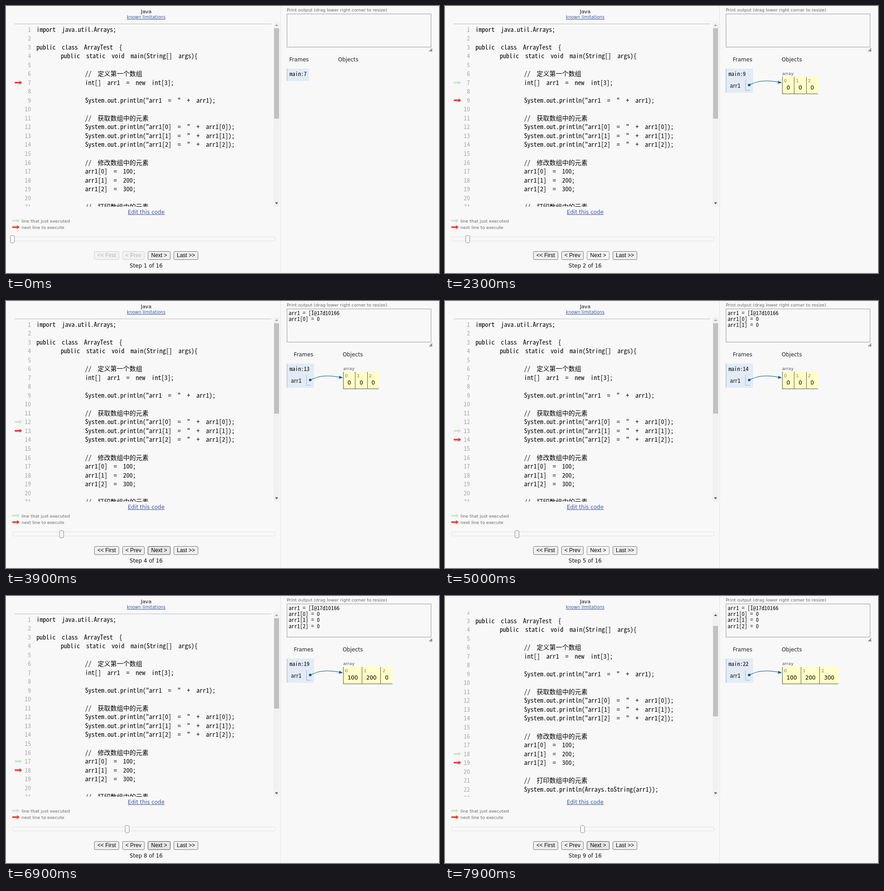
An HTML page with a canvas that plays this animation: 953 px wide and 588 px high, repeating every 8 s.

```html
<!DOCTYPE html>
<html lang="en">
<head>
<meta charset="utf-8">
<title>Java step visualizer</title>
<style>
html, body { margin: 0; width: 100%; height: 100%; overflow: hidden; background: #f8f8f8; }
canvas { display: block; }
</style>
</head>
<body>
<canvas id="stage" width="953" height="588"></canvas>
<script>
const ctx = document.getElementById('stage').getContext('2d');
const LOOP = 8000;
const SANS = '"DejaVu Sans", Verdana, sans-serif';
const MONO = '"Noto Sans Mono CJK SC", "Liberation Mono", monospace';
const CJK = '"Noto Sans CJK SC", "Noto Sans CJK", sans-serif';
const UI = '"Liberation Sans", Arial, sans-serif';
const RED = '#e93f34', GREEN = '#c9e6ca', BLUE = '#005583', LINK = '#3d58a2';

// Code layout
const CHAR = 7.04, SPACE = 13.7, ROW = 19.52;
const INDENT = [67, 120.5, 174];
const rowY = n => 52 + ROW * (n - 1);

// Font size at which one monospace cell has the given width
ctx.font = `100px ${MONO}`;
const cellEm = ctx.measureText('m').width / 100;
const monoSize = cell => cell / cellEm;
const CODE_SIZE = monoSize(CHAR), PRINT_SIZE = monoSize(6.22);

const code = [
  [0, 'import java.util.Arrays;'],
  [0, ''],
  [0, 'public class ArrayTest {'],
  [1, 'public static void main(String[] args){'],
  [0, ''],
  [2, '// 定义第一个数组'],
  [2, 'int[] arr1 = new int[3];'],
  [0, ''],
  [2, 'System.out.println("arr1 = " + arr1);'],
  [0, ''],
  [2, '// 获取数组中的元素'],
  [2, 'System.out.println("arr1[0] = " + arr1[0]);'],
  [2, 'System.out.println("arr1[1] = " + arr1[1]);'],
  [2, 'System.out.println("arr1[2] = " + arr1[2]);'],
  [0, ''],
  [2, '// 修改数组中的元素'],
  [2, 'arr1[0] = 100;'],
  [2, 'arr1[1] = 200;'],
  [2, 'arr1[2] = 300;'],
  [0, ''],
  [2, '// 打印数组中的元素'],
  [2, 'System.out.println(Arrays.toString(arr1));'],
  [0, '']
];
const output = ['arr1 = [I@17d10166', 'arr1[0] = 0', 'arr1[1] = 0', 'arr1[2] = 0'];

// Program run: next line per step, when each step begins, when the button goes down
const nextLine = [7, 9, 12, 13, 14, 17, 18, 19, 22];
const starts = [0, 1300, 2500, 3500, 4300, 5200, 6100, 6900, 7900];
const presses = [1200, 2300, 3300, 4200, 5000, 5900, 6700, 7700];
const MOVE_DELAY = 90, MOVE_TIME = 250;

const clamp = x => Math.max(0, Math.min(1, x));
const easeCubic = x => x < .5 ? 4 * x ** 3 : 1 - 4 * (1 - x) ** 3;

function rect(x, y, w, h, fill) {
  ctx.fillStyle = fill;
  ctx.fillRect(x, y, w, h);
}

function text(str, x, y, size, color = '#111', family = SANS, align = 'left') {
  ctx.font = `${size}px ${family}`;
  ctx.fillStyle = color;
  ctx.textAlign = align;
  ctx.fillText(str, x, y);
}

function poly(points, fill) {
  ctx.beginPath();
  points.forEach(([x, y]) => ctx.lineTo(x, y));
  ctx.closePath();
  ctx.fillStyle = fill;
  ctx.fill();
}

function roundBox(x, y, w, h, r, fill, stroke) {
  ctx.beginPath();
  ctx.roundRect(x, y, w, h, r);
  ctx.fillStyle = fill;
  ctx.fill();
  ctx.strokeStyle = stroke;
  ctx.lineWidth = 1;
  ctx.stroke();
}

function link(str, y, size) {
  text(str, 308.5, y, size, LINK, SANS, 'center');
  const w = ctx.measureText(str).width;
  rect(308.5 - w / 2, y + 1, w, 1, LINK);
}

function arrow(x, y, color) {
  poly([[0, -1.8], [10.4, -1.8], [10.4, -4.5], [16.4, 0], [10.4, 4.5], [10.4, 1.8], [0, 1.8]]
    .map(([dx, dy]) => [x + dx, y + dy]), color);
}

function codeLine([level, str], n) {
  const base = Math.floor(rowY(n) + 5.2);
  text(n, 55, base, CODE_SIZE, '#aaa', MONO, 'right');
  let x = INDENT[level];
  for (const word of str.split(' ')) {
    const wide = /[\u4e00-\u9fff]/.test(word);
    text(word, x, base, wide ? 14 : CODE_SIZE, '#000', wide ? CJK : MONO);
    x += word.length * CHAR + SPACE;
  }
}

function lineArrows(step, dt) {
  const gutter = (line, color) => arrow(19.2, rowY(line) - .4, color);
  const red = nextLine[step];
  if (!step) return gutter(red, RED);
  const from = nextLine[step - 1];
  const done = dt < MOVE_DELAY ? nextLine[step - 2] : from;
  if (done) gutter(done, GREEN);
  const k = easeCubic(clamp((dt - MOVE_DELAY) / MOVE_TIME));
  gutter(from + (red - from) * k, RED);
}

function codePane(step, dt) {
  const scroll = step === 8 ? 36 : 0;
  ctx.save();
  ctx.beginPath();
  ctx.rect(0, 34, 588, 408);
  ctx.clip();
  ctx.translate(0, -scroll);
  rect(19, 39, 565, 1, '#bbb');
  code.forEach((line, i) => codeLine(line, i + 1));
  lineArrows(step, dt);
  ctx.restore();

  rect(589, 35, 13, 407, '#f1f1f1');
  rect(590, scroll ? 66 : 49, 11, 199, '#c1c1c1');
  poly([[592, 44], [595.5, 40], [599, 44]], scroll ? '#505050' : '#a3a3a3');
  poly([[592, 432.5], [595.5, 436.5], [599, 432.5]], '#505050');
}

function button(label, x, w, state) {
  const [fill, stroke, color] = {
    normal: ['#efefef', '#767676', '#000'],
    hover: ['#e5e5e5', '#4f4f4f', '#000'],
    down: ['#f5f5f5', '#8d8d8d', '#000'],
    off: ['#f2f2f2', '#d1d1d1', '#b3b3b3']
  }[state];
  roundBox(x + .5, 540.5, w - 1, 18, 2.5, fill, stroke);
  text(label, x + w / 2, 553, 12, color, UI, 'center');
}

function controls(t, step) {
  link('Edit this code', 458, 11.9);
  arrow(13.8, 472.8, GREEN);
  text('line that just executed', 34, 477, 9.5, '#666');
  arrow(13.8, 487, RED);
  text('next line to execute', 34, 491, 9.5, '#666');

  roundBox(14.5, 508.5, 578, 9, 3, '#f8f8f8', '#e0e0e0');
  roundBox(9.5 + step * 36.1, 505.5, 9, 16, 3, '#fafafa', '#888');

  const back = step ? 'normal' : 'off';
  const down = presses.some((p, i) => t >= p && t < starts[i + 1]);
  button('<< First', 194, 55, back);
  button('< Prev', 256, 49, back);
  button('Next >', 312, 50, down ? 'down' : t >= 900 ? 'hover' : 'normal');
  button('Last >>', 369, 54, 'normal');
  text(`Step ${step + 1} of 16`, 308.5, 576, 11.95, '#111', SANS, 'center');
}

function printBox(step) {
  text('Print output (drag lower right corner to resize)', 618, 12, 9.55, '#666');
  ctx.strokeStyle = '#999';
  ctx.lineWidth = 1;
  ctx.strokeRect(618.5, 17.5, 317, 73);
  output.slice(0, Math.max(0, step - 1)).forEach((line, i) =>
    text(line, 622, Math.floor(31 + i * 13.4), PRINT_SIZE, '#000', MONO));
  poly([[931, 100], [938, 93], [938, 95], [933, 100]], '#555');
  poly([[934.5, 100], [938, 96.5], [938, 100]], '#555');
}

function pointer() {
  ctx.strokeStyle = BLUE;
  ctx.lineWidth = 1.1;
  ctx.beginPath();
  ctx.moveTo(669.5, 174);
  ctx.bezierCurveTo(687, 165, 705, 162, 738, 168.5);
  ctx.stroke();
  ctx.beginPath();
  ctx.arc(669.5, 174, 2.8, 0, Math.PI * 2);
  ctx.fillStyle = BLUE;
  ctx.fill();
  poly([[741.5, 169], [732, 171.3], [734, 168], [733, 164.5]], BLUE);
}

function arrayCells(step) {
  text('array', 742, 152, 9.55, '#555');
  let x = 742;
  [100, 200, 300].forEach((full, i) => {
    const value = step >= 6 + i ? full : 0;
    const w = value ? 41.2 : 26.3;
    rect(x, 156, w, 38, '#ffffc6');
    rect(Math.round(x), 156, 1, 38, '#555');
    rect(x, 193, w, 1, '#555');
    text(i, x + 4.3, 168, 9.55, '#777');
    text(value, x + w / 2 + .5, 184, 11.9, '#000', SANS, 'center');
    x += w;
  });
}

function memory(step) {
  const shift = step ? 10 : 0;
  text('Frames', 623.5 + shift, 122, 11.8, '#222');
  text('Objects', 731 + shift, 122, 11.8, '#222');
  rect(618, 138, step ? 60 : 49, step ? 53 : 27, '#e2ebf6');
  rect(618, 138, 1, step ? 53 : 27, '#a6b3b6');
  text('main:' + nextLine[step], 624, 154, monoSize(6.3), '#000', MONO);
  if (!step) return;
  text('arr1', 627, 180, 11.6, '#111');
  rect(661, 163, 1, 23, '#a6b3b6');
  rect(661, 185, 10, 1, '#a6b3b6');
  arrayCells(step);
  pointer();
}

function draw(t) {
  const step = starts.filter(s => s <= t).length - 1;
  rect(0, 0, 953, 588, '#f8f8f8');
  text('Java', 308.5, 16, 11, '#111', SANS, 'center');
  link('known limitations', 28, 9.6);
  codePane(step, t - starts[step]);
  controls(t, step);
  rect(604, 0, 1, 588, '#e4e4e4');
  printBox(step);
  memory(step);
}

const begin = performance.now();
function tick() {
  draw((performance.now() - begin) % LOOP);
  requestAnimationFrame(tick);
}
tick();
</script>
</body>
</html>
```
